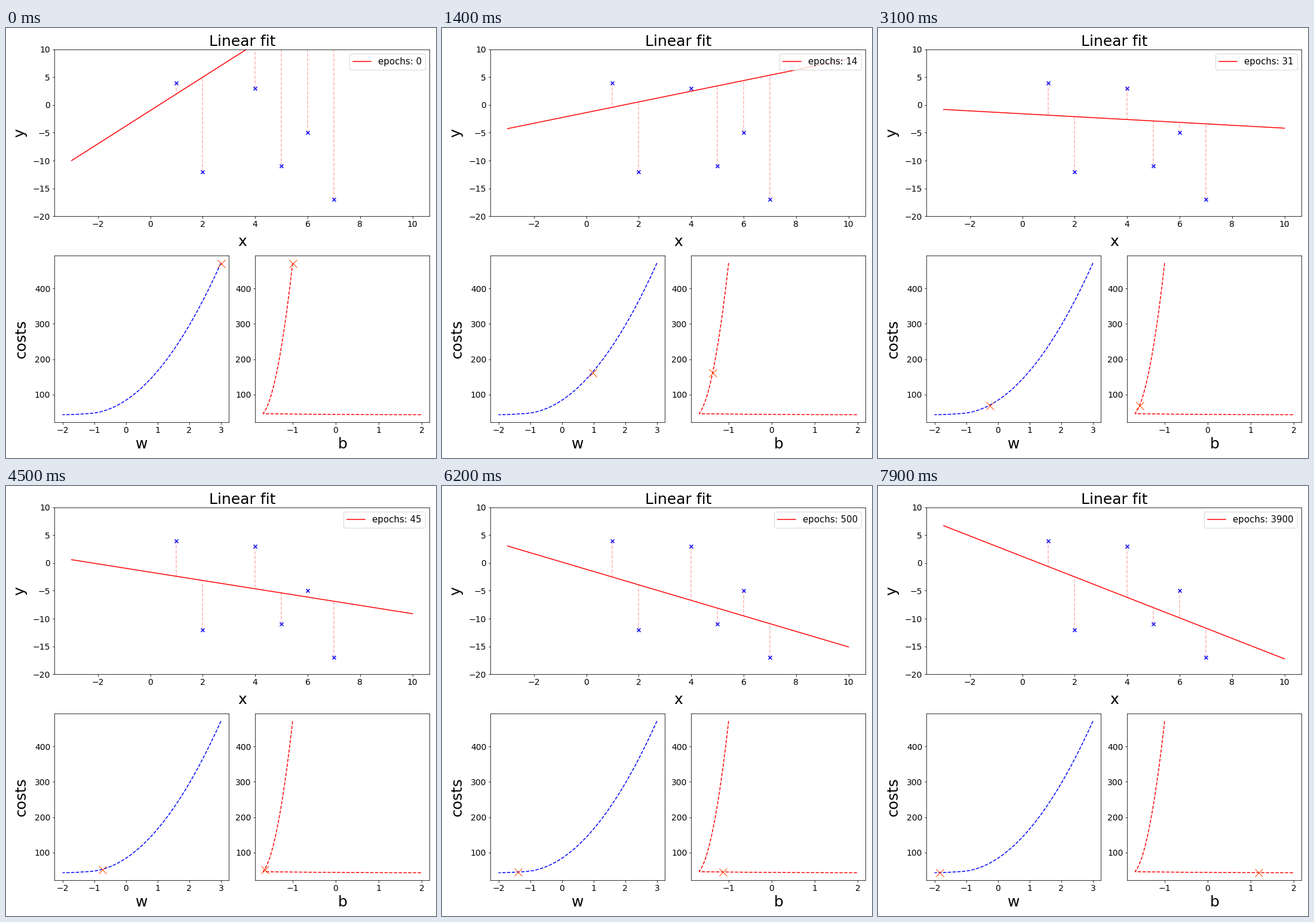
A matplotlib script that plays this animation: 720x720 px, repeating every 8000 ms.

```python
import numpy as np
import matplotlib.pyplot as plt
from matplotlib.animation import FuncAnimation

plt.rcParams.update({"font.family": "DejaVu Sans", "xtick.labelsize": 14,
                     "ytick.labelsize": 14})

x = np.array([1, 2, 4, 5, 6, 7], float)
y = np.array([4, -12, 3, -11, -5, -17], float)


def descend(w, b, rate=0.002, epochs=20000):
    """Gradient descent on the mean squared error; rows of w, b, cost."""
    path = []
    for _ in range(epochs + 1):
        err = w * x + b - y
        path.append((w, b, np.dot(err, err) / x.size))
        w, b = w - rate * np.dot(err, x) / x.size, b - rate * err.sum() / x.size
    return np.array(path).T


ws, bs, costs = descend(3.0, -1.0)

# Small steps first, then larger and larger jumps.
epochs = np.concatenate([np.arange(50), np.arange(50, 100, 5),
                         np.arange(100, 4000, 200)])

fig = plt.figure(figsize=(10, 10), dpi=72)
grid = fig.add_gridspec(2, 2)
fit_ax = fig.add_subplot(grid[0, :])
w_ax = fig.add_subplot(grid[1, 0])
b_ax = fig.add_subplot(grid[1, 1])

span = np.array([-3.0, 10.0])
fit_ax.scatter(x, y, marker="x", color="blue")
fit_line, = fit_ax.plot(span, ws[0] * span + bs[0], color="red")
gaps = [fit_ax.plot([], [], "--", color="red", alpha=0.3)[0] for _ in x]
fit_ax.set_ylim(-20, 10)
fit_ax.set_title("Linear fit", fontsize=25)
fit_ax.set_xlabel("x", fontsize=25, labelpad=10)
fit_ax.set_ylabel("y", fontsize=25, labelpad=10)
legend = fit_ax.legend([fit_line], ["epochs: 0"], loc="upper right", fontsize=15)
label = legend.get_texts()[0]


def cost_plot(ax, values, name, color):
    ax.plot(values, costs, "--", color=color)
    ax.set_xlabel(name, fontsize=25)
    return ax.plot(values[:1], costs[:1], "x", ms=13, color="orangered")[0]


w_mark = cost_plot(w_ax, ws, "w", "blue")
b_mark = cost_plot(b_ax, bs, "b", "red")
w_ax.set_ylabel("costs", fontsize=25, labelpad=10)
fig.tight_layout()


def update(i):
    n = epochs[i]
    w, b, cost = ws[n], bs[n], costs[n]
    fit_line.set_ydata(w * span + b)
    for gap, px, py in zip(gaps, x, y):
        gap.set_data([px, px], [py, w * px + b])
    label.set_text(f"epochs: {n}")
    w_mark.set_data([w], [cost])
    b_mark.set_data([b], [cost])
    return [fit_line, *gaps, label, w_mark, b_mark]


anim = FuncAnimation(fig, update, frames=len(epochs), interval=100,
                     repeat=True, repeat_delay=0)
plt.show()
```
